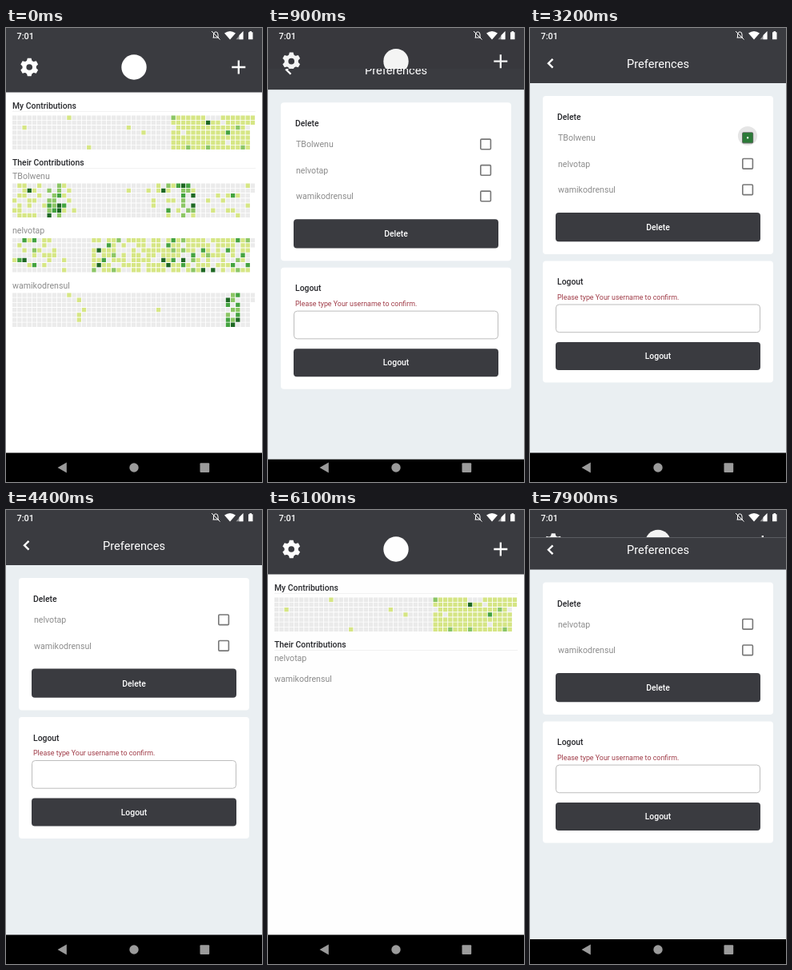
These frames come from a looping animation (320 by 568 pixels, 8 s). An HTML page:

```html
<!DOCTYPE html>
<html lang="en">
<head>
<meta charset="utf-8">
<title>Contributions</title>
<style>
  html, body { margin: 0; width: 100%; height: 100%; overflow: hidden; background: #000; }
  svg { display: block; width: 100vw; height: 100vh; }
  text { font: 10.6px Roboto, "Open Sans", sans-serif; fill: #8c8c8c; }
  .head { font-weight: 500; font-size: 10.4px; fill: #26272b; }
  .btn { font-weight: 500; font-size: 10.4px; fill: #fff; text-anchor: middle; }
  .title { font-size: 14.6px; fill: #fff; text-anchor: middle; }
  .warn { font-size: 8.9px; fill: #a03c48; }
  .clock { font-weight: 500; font-size: 10.9px; fill: #fff; }
  .bar { fill: #3a3b40; }
  .line { fill: none; stroke: #fff; }
</style>
</head>
<body>
<svg viewBox="0 0 320 568">
  <defs>
    <clipPath id="clip"><rect id="clipRect" width="320" height="620"/></clipPath>
  </defs>

  <g id="home">
    <rect y="-20" width="320" height="552" fill="#fff"/>
    <rect y="531.5" width="320" height="60"/>
    <rect class="bar" y="-20" width="320" height="100.5"/>
    <g id="gear" fill="#fff" transform="translate(29.2 49) scale(1.06)">
      <circle r="5.9" fill="none" stroke="#fff" stroke-width="4.6"/>
    </g>
    <circle cx="160" cy="49" r="15.7" fill="#fff"/>
    <path class="line" stroke-width="2.3" d="M282.3 49h17M290.8 40.5v17"/>
    <path stroke="#f2f2f2" d="M8 104.5h304M8 175.5h304"/>
    <text class="head" x="8" y="100.6">My Contributions</text>
    <text class="head" x="8" y="172">Their Contributions</text>
    <g id="mine"></g>
    <g id="full"></g>
    <g id="bare"></g>
    <g id="fresh"></g>
    <rect id="dim" y="-20" width="320" height="620"/>
  </g>

  <g id="prefs">
    <g clip-path="url(#clip)">
      <rect width="320" height="532" fill="#eaeff2"/>
      <rect y="531.5" width="320" height="60"/>
      <rect class="bar" width="320" height="69"/>
      <path class="line" stroke-width="2.4" d="M28.5 38.8l-5.5 5.4 5.5 5.4"/>
      <text class="title" x="160" y="49.6">Preferences</text>
      <g id="three"></g>
      <g id="two"></g>
      <g id="tick">
        <circle id="ripple" cx="272" cy="135"/>
        <rect x="265.8" y="131" width="12.6" height="12.6" rx="1.2" fill="#2c7a38"/>
        <rect id="hole" fill="#fff"/>
        <path id="mark" class="line" stroke-width="1.6" d="M268 137.4l2.9 2.9 5.6-5.8" stroke-dasharray="13"/>
      </g>
    </g>
  </g>

  <text class="clock" x="13.5" y="13.6">7:01</text>
  <path class="line" d="M258.5 12h7.5M259.5 12V8q0-3 2.700-3.200 2.800.2 2.800 3.200v4M257 4l10.500 10.500"/>
  <g fill="#fff">
    <path d="M273 6.600q7-5 14 0l-7 8z"/>
    <path d="M296.500 4v10.200h-5V9z"/>
    <path d="M287.500 14.200l9-10.200v10.200z" opacity=".45"/>
    <path d="M303 5.200h1.500V4h2.500v1.200h1.500v9H303z"/>
  </g>
  <g fill="#9b9b9b">
    <path d="M64.500 550l11.300-6.500v13z"/>
    <circle cx="160" cy="550" r="5.700"/>
    <rect x="242.500" y="544.300" width="11.700" height="11.700" rx="1"/>
  </g>
</svg>
<script>
const LOOP = 8000, SLIDE = 425, OPEN = 723, CLOSE = 5696, REOPEN = 7693;
const $ = id => document.getElementById(id);
const clamp = v => Math.min(1, Math.max(0, v));
const names = ['TBolwenu', 'nelvotap', 'wamikodrensul'];
const shades = ['#ebebeb', '#d6e685', '#8cc665', '#44a340', '#1e6823'];

// busy: spans of columns with a density; peaks: columns of dark cells.
const mine = { seed: 3, cols: 49, busy: [[32, 48, .85]], peaks: [] };
const theirs = [
  { seed: 8, cols: 53, busy: [[4, 15, .4], [32, 40, .4], [43, 51, .18]], peaks: [11, 12, 13, 38, 39] },
  { seed: 5, cols: 53, busy: [[5, 12, .5], [20, 51, .68]], peaks: [38, 49] },
  { seed: 2, cols: 53, busy: [[15, 19, .14]], peaks: [47, 48, 49] }
];

function noise(c, r, seed) {
  const v = Math.sin(c * 12.9898 + r * 78.233 + seed * 37.719) * 43758.5453;
  return v - Math.floor(v);
}

function levelAt({ seed, busy, peaks }, c, r) {
  const chance = noise(c, r, seed), depth = noise(r, c, seed + 9);
  if (peaks.includes(c)) return chance < .7 ? 2 + Math.floor(depth ** 2 * 3) : 0;
  const span = busy.find(([from, to]) => c >= from && c <= to);
  return chance < (span ? span[2] : .015) ? 1 + Math.floor(depth ** 9 * 3.5) : 0;
}

function graph(g, top, skip = 0) {
  const step = 304 / 49, paths = shades.map(() => '');
  for (let c = skip; c < skip + 49; c++) {
    const rows = c === g.cols - 1 ? 2 : 7;
    for (let r = 0; r < rows; r++) {
      const x = 8 + (c - skip) * step, y = top + r * step;
      paths[levelAt(g, c, r)] += `M${x.toFixed(2)} ${y.toFixed(2)}h5.3v5.3h-5.3z`;
    }
  }
  return paths.map((d, i) => `<path fill="${shades[i]}" d="${d}"/>`).join('');
}

const label = (x, y, s, cls = '') => `<text class="${cls}" x="${x}" y="${y}">${s}</text>`;
const box = (x, y, w, h, attrs) => `<rect x="${x}" y="${y}" width="${w}" height="${h}" ${attrs}/>`;

function people(first, skip) {
  return names.slice(first).map((n, i) =>
    label(8, 188.7 + i * 68.4, n) + graph(theirs[first + i], 194.6 + i * 68.4, skip)).join('');
}

function forms(list) {
  const d = (list.length - 3) * 32.5;
  const card = 'rx="4" fill="#fff"', button = 'rx="4" class="bar"';
  const rows = list.map((n, i) => {
    const y = 137.3 + i * 32.5;
    return label(35, y + 4, n) +
      box(265.8, y - 6.3, 12.6, 12.6, 'rx="1.2" fill="#fff" stroke="#777" stroke-width="1.6"');
  }).join('');
  return box(16, 85, 288, 198 + d, card) + label(34, 115, 'Delete', 'head') + rows +
    `<g transform="translate(0 ${d})">` +
    box(32, 231, 256, 36.3, button) + label(160, 253, 'Delete', 'btn') +
    box(16, 291.5, 288, 152, card) + label(34, 321, 'Logout', 'head') +
    label(34, 339.6, 'Please type Your username to confirm.', 'warn') +
    box(32.5, 346, 255, 34.7, 'rx="4" fill="#fff" stroke="#bdbdbd"') +
    box(32, 393, 256, 35, button) + label(160, 414.3, 'Logout', 'btn') + '</g>';
}

for (let a = 0; a < 360; a += 60)
  $('gear').innerHTML += `<path d="M-3.2-7l1-3.6h4.4l1 3.6z" transform="rotate(${a})"/>`;
$('mine').innerHTML = graph(mine, 109.6);
$('full').innerHTML = people(0, 4);
$('bare').innerHTML = label(8, 188.7, names[1]) + label(8, 214.7, names[2]);
$('fresh').innerHTML = people(1, 0);
$('three').innerHTML = forms(names);
$('two').innerHTML = forms(names.slice(1));

function bezier(x1, y1, x2, y2) {
  const at = (a, b, s) => 3 * a * s * (1 - s) ** 2 + 3 * b * s * s * (1 - s) + s ** 3;
  return x => {
    let lo = 0, hi = 1;
    for (let i = 0; i < 24; i++) {
      const mid = (lo + hi) / 2;
      if (at(x1, x2, mid) < x) lo = mid; else hi = mid;
    }
    return at(y1, y2, (lo + hi) / 2);
  };
}
const moveEase = bezier(.4, 0, .2, 1);
const rise = bezier(.3, 0, .8, .15), settle = bezier(.05, .7, .1, 1);
const clipEase = p => p < 1 / 6 ? .4 * rise(p * 6) : .4 + .6 * settle((p - 1 / 6) * 1.2);

const show = (id, on) => $(id).style.display = on ? '' : 'none';
const set = (id, attrs) => { for (const k in attrs) $(id).setAttribute(k, attrs[k]); };

// The upper screen slides and is uncovered while the home screen shifts and dims.
function slide(t) {
  const closing = t >= CLOSE && t < REOPEN;
  const start = closing ? CLOSE : t < CLOSE ? OPEN : REOPEN;
  const p = clamp((t - start) / SLIDE);
  const hidden = v => closing ? v : 1 - v;
  const move = hidden(moveEase(p)), cut = hidden(clipEase(p));
  show('prefs', closing ? p < 1 : p > 0);
  set('prefs', { transform: `translate(0 ${23.3 * move})` });
  set('clipRect', { y: 544.7 * cut });
  set('home', { transform: `translate(0 ${-11.3 * (1 - move)})` });
  set('dim', { opacity: .1 * (1 - hidden(p)) });
}

function check(t) {
  const on = t >= 3130 && t < 4400;
  show('tick', on);
  if (!on) return;
  const size = 10 * (1 - clamp((t - 3130) / 90));
  set('hole', { x: 272.1 - size / 2, y: 137.3 - size / 2, width: size, height: size });
  set('mark', { 'stroke-dashoffset': 13 * (1 - clamp((t - 3230) / 120)), opacity: t > 3230 ? 1 : 0 });
  set('ripple', { r: 8 + 7.5 * clamp((t - 3130) / 130), opacity: .1 * (1 - clamp((t - 3300) / 260)) });
}

function frame() {
  const t = performance.now() % LOOP;
  slide(t);
  check(t);
  show('full', t < 4400);
  show('bare', t >= 4400 && t < 6200);
  show('fresh', t >= 6200);
  show('three', t < 4400);
  show('two', t >= 4400);
  requestAnimationFrame(frame);
}
frame();
</script>
</body>
</html>
```
